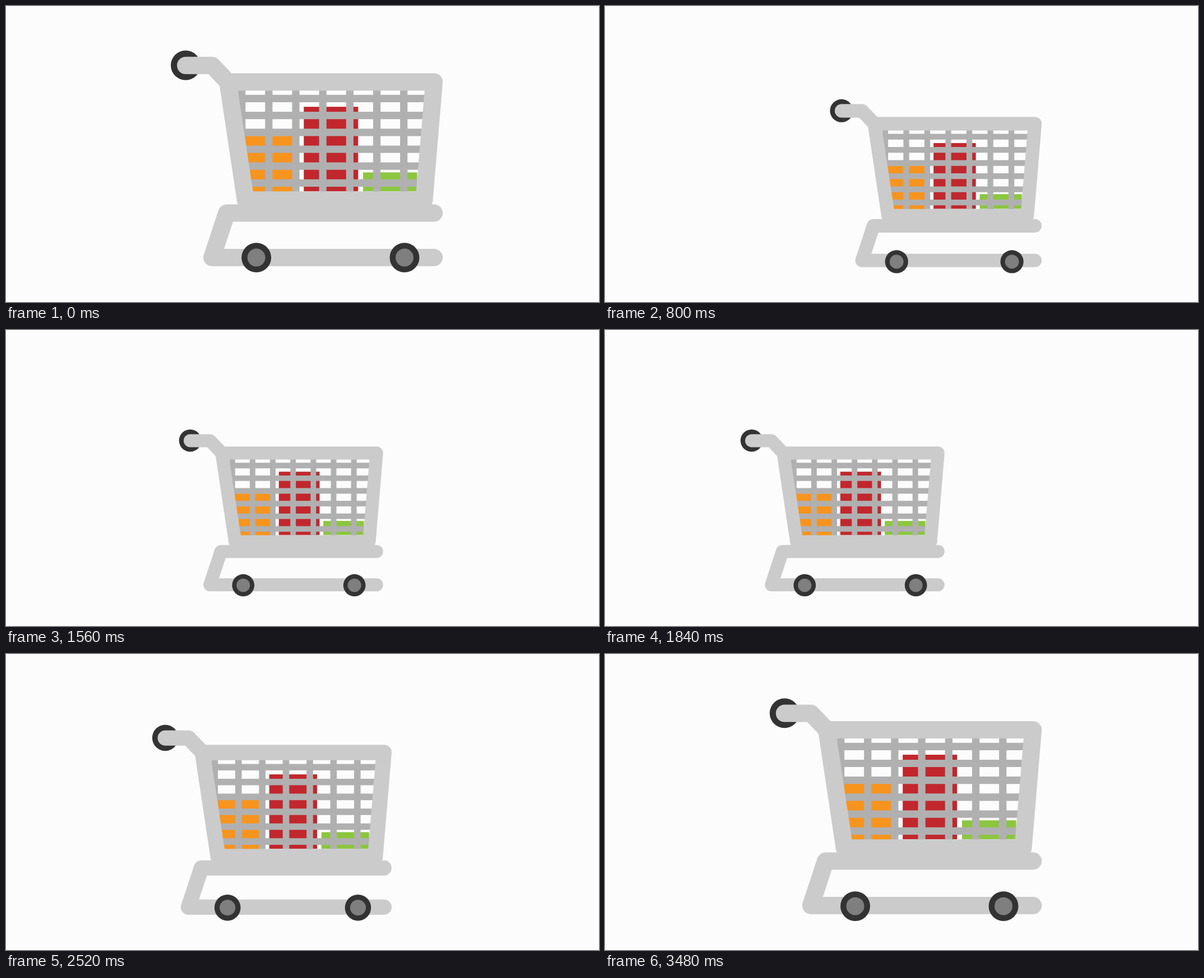
An HTML page that plays this animation: 1058 px wide and 529 px high, repeating every 3520 ms.

```html
<!DOCTYPE html>
<html lang="en">
<head>
<meta charset="utf-8">
<title>Shopping cart</title>
<style>
  html, body { margin: 0; width: 100%; height: 100%; overflow: hidden; background: #fcfcfc; }
  svg { display: block; width: 100%; height: 100%; }
  .frame { fill: none; stroke: #cbcbcb; stroke-width: 31; stroke-linecap: round; stroke-linejoin: round; }
  .grid { fill: none; stroke: #b0b0b0; stroke-width: 13.2; }
  .dark { fill: #333; }
  .hub { fill: #7f7f7f; }
</style>
</head>
<body>
<svg viewBox="0 0 1058 529">
  <g id="cart">
    <rect class="item" x="425.5" y="232" width="97" height="101" fill="#f7941d"/>
    <rect class="item" x="531.2" y="180" width="97" height="151" fill="#c1272d"/>
    <rect class="item" x="637" y="297.3" width="96.5" height="33.7" fill="#8cc63f"/>
    <path id="grid" class="grid"/>
    <circle class="dark" cx="320.3" cy="105.8" r="26.5"/>
    <path class="frame" d="M320.3 106H367.5L395.5 135.5H763.7L746 346.7H427.2L395.5 135.5"/>
    <path class="frame" d="M763.7 370H393.5L367.3 449.6H763.7"/>
    <g id="wheels">
      <circle class="dark" cx="446.5" cy="449.6" r="26.5"/>
      <circle class="hub" cx="446.5" cy="449.6" r="16"/>
      <circle class="dark" cx="711" cy="449.6" r="26.5"/>
      <circle class="hub" cx="711" cy="449.6" r="16"/>
    </g>
  </g>
</svg>
<script>
const LOOP = 3520, STEP = 40;
const PIVOT = { x: 779, y: 473 };
const SHRINK = 0.25, TRAVEL = 190;
const HOP = { height: 33.5, time: 250, starts: [1989, 2090, 2190] };
const BOB = { height: 4.1, period: 120 };

const cart = document.getElementById('cart');
const wheels = document.getElementById('wheels');
const items = [...document.querySelectorAll('.item')];

let bars = '';
for (let i = 0; i < 7; i++) bars += `M${420.5 + 48.2 * i} 136V346`;
for (let i = 0; i < 6; i++) bars += `M412 ${165.3 + 30.2 * i}H747`;
document.getElementById('grid').setAttribute('d', bars);

// Sine ease in and out, from 0 to 1
function ease(t, start, time) {
  const u = Math.min(1, Math.max(0, (t - start) / time));
  return (1 - Math.cos(Math.PI * u)) / 2;
}

function hop(t, start) {
  const u = (t - start) / HOP.time;
  return u > 0 && u < 1 ? 4 * u * (1 - u) * HOP.height : 0;
}

function bob(t) {
  if (t < STEP) return 0;
  const turns = t < 1100 ? (t - 43) / BOB.period : t / BOB.period + 0.83;
  return BOB.height * (1 - Math.cos(2 * Math.PI * turns)) / 2;
}

const move = (el, y) => el.setAttribute('transform', `translate(0 ${y.toFixed(3)})`);

function draw(t) {
  const back = 1 - ease(t, 2000, 1014);
  const scale = 1 - SHRINK * ease(t, -31, 1063) * back;
  const x = PIVOT.x - TRAVEL * ease(t, 1003, 1035) * back;
  cart.setAttribute('transform',
    `translate(${x} ${PIVOT.y}) scale(${scale}) translate(${-PIVOT.x} ${-PIVOT.y})`);
  items.forEach((el, i) => move(el, -hop(t, HOP.starts[i])));
  move(wheels, bob(t));
}

const begin = performance.now();
function tick() {
  const t = (performance.now() - begin) % LOOP;
  draw(Math.floor(t / STEP) * STEP);
  requestAnimationFrame(tick);
}
draw(0);
requestAnimationFrame(tick);
</script>
</body>
</html>
```
